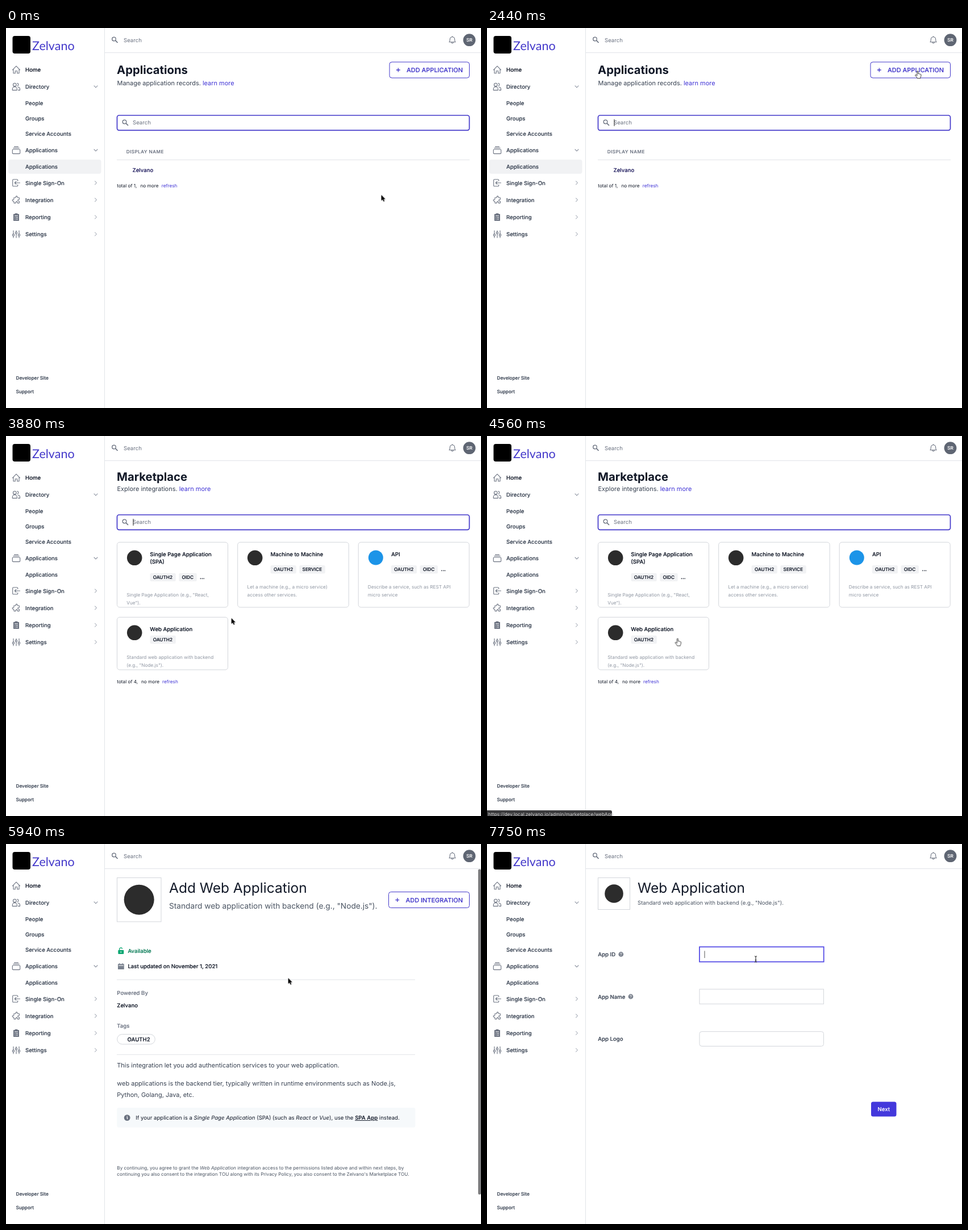
These frames come from a looping animation (836x670 px, 8000 ms). An HTML page:

```html
<!DOCTYPE html>
<html lang="en">
<head>
<meta charset="utf-8">
<title>Admin console</title>
<style>
html, body { margin: 0; width: 100%; height: 100%; overflow: hidden; background: #fff; }
svg { display: block; width: 836px; height: 670px; }
text { font: 400 9.6px Inter, "Liberation Sans", sans-serif; color: #111827; white-space: pre; text-rendering: geometricPrecision; }
text, tspan { fill: currentColor; }
.xs { font-size: 8.23px; }
.md { font-size: 10.96px; }
.lg { font-size: 13.7px; }
.h1 { font-size: 20.3px; font-weight: 700; }
.h2 { font-size: 24.5px; }
/* the hairline stroke thickens medium text a little */
.m { font-weight: 500; stroke: currentColor; stroke-width: .18px; }
.g4 { color: #9097a3; }
.g5 { color: #6b7280; }
.g6 { color: #4b5563; }
.g7 { color: #374151; }
.white { color: #fff; }
.green { color: #067a55; }
.navy { color: #221f60; }
.link { color: #4034d6; }
.brand { font: 400 21.5px Lato, "Open Sans", sans-serif; color: #4338ca; }
.btn { color: #4338ca; font-weight: 500; text-anchor: end; }
.th { letter-spacing: .05em; }
.mid { text-anchor: middle; }
.it { font-style: italic; }
.strong { color: #111827; font-weight: 600; text-decoration: underline; }
.url { font-size: 8.4px; color: #d6d6d6; }
.icon { fill: none; stroke: #6b7280; stroke-width: 1.1; stroke-linecap: round; stroke-linejoin: round; }
.chev { fill: none; stroke: #8f96a3; stroke-width: 1.1; stroke-linecap: round; stroke-linejoin: round; }
.pale { stroke: #b4b9c2; }
.line { stroke: #e1e4e8; }
.card { fill: #fff; stroke: #d3d6db; }
.focus { fill: #fff; stroke: #4338ca; stroke-width: 1.7; }
.outline { fill: #fff; stroke: #4338ca; }
.halo { fill: #fff; stroke: #4f46e5; stroke-width: 1.9; }
.pressed { fill: #f7f7ff; stroke: #c3c5f5; }
.chip { fill: #f1f2f4; }
.seal { fill: #2c2c2c; }
.bar { fill: #3b3b3d; }

/* 1% of the loop is 80 ms */
.t { opacity: 0; animation: 8s step-end infinite; }
.apps { animation-name: apps; }
.market { animation-name: market; }
.detail { animation-name: detail; }
.form { animation-name: form; }
.ring1 { animation-name: ring1; }
.ring2 { animation-name: ring2; }
.url1 { animation-name: url1; }
.url2 { animation-name: url2; }
.url3 { animation-name: url3; }
.caret1 { animation-name: caret1; }
.caret2 { animation-name: caret2; }
.caret3 { animation-name: caret3; }
.field { animation-name: field; }
.arrow { animation-name: arrow; }
.hand { animation-name: hand; }
.ibeam { animation-name: ibeam; }
@keyframes apps { 0% { opacity: 1 } 35.1% { opacity: 0 } }
@keyframes market { 35.1% { opacity: 1 } 62.5% { opacity: 0 } }
@keyframes detail { 62.5% { opacity: 1 } 87.5% { opacity: 0 } }
@keyframes form { 87.5%, 100% { opacity: 1 } }
@keyframes ring1 { 31.25% { opacity: 1 } 35.1% { opacity: 0 } }
@keyframes ring2 { 85% { opacity: 1 } 87.5% { opacity: 0 } }
@keyframes url1 { 31.25% { opacity: 1 } 38.5% { opacity: 0 } }
@keyframes url2 { 53% { opacity: 1 } 67% { opacity: 0 } }
@keyframes url3 { 83.75% { opacity: 1 } 89% { opacity: 0 } }
@keyframes caret1 { 4.75%, 17.25%, 29.75% { opacity: 1 } 11%, 23.5% { opacity: 0 } }
@keyframes caret2 { 35.1%, 47.6%, 60.1% { opacity: 1 } 41.35%, 53.85% { opacity: 0 } }
@keyframes caret3 { 96.85%, 100% { opacity: 1 } }
@keyframes field { 95.35%, 100% { opacity: 1 } }
@keyframes arrow {
  0%, 35.1%, 62.5%, 87.5% { opacity: 1 }
  20.1%, 49.2%, 81%, 91.5% { opacity: 0 }
}
@keyframes hand {
  20.1%, 49.2%, 81% { opacity: 1 }
  35.1%, 62.5%, 87.5% { opacity: 0 }
}
@keyframes ibeam { 91.5%, 100% { opacity: 1 } }

.cursor { animation: path 8s linear infinite; }
@keyframes path {
  0%, 10.1% { transform: translate(660.5px, 294.3px) }
  12.5% { transform: translate(668px, 262px) }
  16.4% { transform: translate(701.5px, 158.3px) }
  19.4% { transform: translate(740px, 90px) }
  21%, 40.6% { transform: translate(758px, 76px) }
  42.5% { transform: translate(700px, 105px) }
  48.5% { transform: translate(397px, 320.8px) }
  50% { transform: translate(353px, 350px) }
  51.3%, 69.5% { transform: translate(335.5px, 357.2px) }
  72% { transform: translate(375px, 303px) }
  76% { transform: translate(590px, 185px) }
  80% { transform: translate(750px, 106px) }
  81.5%, 88.2% { transform: translate(769px, 98px) }
  92.2%, 100% { transform: translate(473px, 203px) }
}
</style>
</head>
<body>
<svg viewBox="0 0 836 670">
  <defs>
    <path id="down" class="chev" d="M-3-1.5 0 1.5 3-1.5"/>
    <path id="right" class="chev pale" d="M-1.5-3 1.5 0-1.5 3"/>
    <g id="lens" fill="none" stroke="#6b7280">
      <circle cx="-1.5" cy="-1.5" r="3.3" stroke-width="1.3"/>
      <path d="M1.2 1.2 5 5" stroke-width="1.7"/>
    </g>
    <g id="help">
      <circle r="4.4" fill="#7b828e"/>
      <path d="M-1.4-.9C-1.4-3 1.5-2.8 1.4-1 1.3 0 0-.1 0 1M0 2v.9" fill="none" stroke="#fff" stroke-width=".9"/>
    </g>
    <path id="plus" d="M-3.4 0H3.4M0-3.4V3.4" stroke="#4338ca" stroke-width="1.3"/>
  </defs>

  <!-- sidebar -->
  <rect width="836" height="670" fill="#fff"/>
  <rect class="t apps" x="4" y="232" width="163.5" height="25" rx="4" fill="#f1f2f4"/>
  <rect x="11.5" y="14" width="31.5" height="31" rx="4"/>
  <text class="brand" x="46" y="38.5">Zelvano</text>

  <g class="icon">
    <path d="M11.5 73.8 18 67.2l6.5 6.6M13 72.5V79.7h3.3v-4h3.4v4H23V72.5"/>
    <circle cx="15.3" cy="100" r="2.8"/>
    <path d="M11.3 109.6v-2a4 4 0 0 1 8 0v2ZM20 97.4a2.5 2.5 0 0 1 0 4.8M21 104.2a3.6 3.6 0 0 1 3.5 3.6v1.8h-3"/>
    <rect x="11.3" y="214" width="13.4" height="7.6" rx="1.3"/>
    <path d="M12.8 211.8h10.4M14.5 209.4h7"/>
    <path d="M20.7 269.8v-1.5q0-1.3-1.3-1.3H13q-1.3 0-1.3 1.3v9.4q0 1.3 1.3 1.3h6.4q1.3 0 1.3-1.3v-1.5M24.5 273H15.3M18 270.3 15.3 273l2.7 2.7"/>
    <path transform="translate(9.8 295) scale(.68)" stroke-width="1.6" d="M11 4a2 2 0 1 1 4 0v1a1 1 0 0 0 1 1h3a1 1 0 0 1 1 1v3a1 1 0 0 1-1 1h-1a2 2 0 1 0 0 4h1a1 1 0 0 1 1 1v3a1 1 0 0 1-1 1h-3a1 1 0 0 1-1-1v-1a2 2 0 1 0-4 0v1a1 1 0 0 1-1 1H7a1 1 0 0 1-1-1v-3a1 1 0 0 0-1-1H4a2 2 0 1 1 0-4h1a1 1 0 0 0 1-1V7a1 1 0 0 1 1-1h3a1 1 0 0 0 1-1z"/>
    <path d="M13 357.2v6M13 367v2.7M18 357.2v2.2M18 363.3v6.4M23 357.2v6M23 367v2.7"/>
    <circle cx="13" cy="365.1" r="1.7"/><circle cx="18" cy="361.3" r="1.7"/><circle cx="23" cy="365.1" r="1.7"/>
  </g>
  <path d="M13 328h2.6v-1.2h4.8V328H23v12H13Z" fill="#6b7280"/>
  <path d="M15 331h6M15 334h1.2M17.5 334H21M15 337h1.2M17.5 337H21" stroke="#fff"/>

  <text class="m" x="34" y="76.5">Home</text>
  <text class="m g7" x="34" y="107">Directory</text>
  <text class="m g7" x="34" y="135.5">People</text>
  <text class="m g7" x="34" y="163">Groups</text>
  <text class="m g7" x="34" y="190.4">Service Accounts</text>
  <text class="m g7" x="34" y="219">Applications</text>
  <text class="m g7" x="34" y="247.8">Applications</text>
  <text class="m g7" x="34" y="276.5">Single Sign-On</text>
  <text class="m g7" x="34" y="306.5">Integration</text>
  <text class="m g7" x="34" y="336.8">Reporting</text>
  <text class="m g7" x="34" y="366.8">Settings</text>
  <text class="m xs g7" x="17.5" y="619.5">Developer Site</text>
  <text class="m xs g7" x="17.5" y="644">Support</text>
  <use href="#down" x="158" y="103.3"/><use href="#down" x="158" y="215.5"/>
  <use href="#right" x="158" y="273"/><use href="#right" x="158" y="303"/>
  <use href="#right" x="158" y="333.3"/><use href="#right" x="158" y="363.3"/>

  <!-- top bar -->
  <path class="line" d="M173.5 0V670M173 43.5H836"/>
  <use href="#lens" x="191.5" y="21"/>
  <text class="g5" x="207" y="25.3">Search</text>
  <path class="icon" d="M780 24.8c1.4-1.4 1.4-2.4 1.4-5a4.1 4.1 0 0 1 8.2 0c0 2.6 0 3.6 1.4 5ZM783.7 25a1.8 1.8 0 0 0 3.6 0M785.5 15.4v-.9"/>
  <circle cx="815.5" cy="21.2" r="10.9" fill="#5f6673"/>
  <text class="m xs mid white" x="815.5" y="24.2">SR</text>

  <!-- applications list -->
  <g class="t apps">
    <text class="h1" x="195" y="81.3">Applications</text>
    <text class="md g7" x="195.5" y="100.6">Manage application records. <tspan class="link">learn more</tspan></text>
    <rect class="outline" x="675" y="60" width="140.5" height="28" rx="4"/>
    <g class="t ring1">
      <rect class="halo" x="673" y="58" width="144.3" height="32" rx="5.5"/>
      <rect class="pressed" x="675" y="60" width="140.5" height="28" rx="4"/>
    </g>
    <use href="#plus" x="690.3" y="74"/>
    <text class="m md btn" x="804" y="78">ADD APPLICATION</text>
    <rect class="focus" x="195.5" y="154" width="620" height="26.3" rx="3.5"/>
    <use href="#lens" x="210" y="167"/>
    <text class="g5" x="223" y="170.4">Search</text>
    <path class="t caret1" d="M224 161V173" stroke="#222"/>
    <text class="m xs th g5" x="211.8" y="221">DISPLAY NAME</text>
    <path class="line" d="M195 232.5H816"/>
    <text class="m navy" x="222.5" y="254">Zelvano</text>
    <text class="xs" x="195.3" y="280.6">total of 1,</text>
    <text class="xs" x="236.5" y="280.6">no more</text>
    <text class="xs link" x="273.7" y="280.6">refresh</text>
  </g>

  <!-- marketplace -->
  <g class="t market">
    <text class="h1" x="195" y="79.2">Marketplace</text>
    <text class="md g7" x="195.5" y="96.5">Explore integrations. <tspan class="link">learn more</tspan></text>
    <rect class="focus" x="195.5" y="139" width="620" height="26.3" rx="3.5"/>
    <use href="#lens" x="210" y="152"/>
    <text class="g5" x="223" y="155.4">Search</text>
    <path class="t caret2" d="M224 146V158" stroke="#222"/>

    <rect class="card" x="195.5" y="187.3" width="195" height="114.7" rx="4.5"/>
    <rect class="card" x="407.7" y="187.3" width="195.5" height="114.7" rx="4.5"/>
    <rect class="card" x="620.2" y="187.3" width="195" height="114.7" rx="4.5"/>
    <rect class="card" x="195.5" y="319.5" width="195" height="92.7" rx="4.5"/>
    <circle class="seal" cx="226.2" cy="214.8" r="13.3"/>
    <circle class="seal" cx="438.2" cy="214.8" r="13.3"/>
    <circle class="seal" cx="226.2" cy="346.8" r="13.3"/>
    <circle cx="650.8" cy="214.5" r="13" fill="#1c94e8"/>

    <text class="m" x="253.3" y="211.6">Single Page Application</text>
    <text class="m" x="253.3" y="225.2">(SPA)</text>
    <text class="m" x="465.5" y="211.6">Machine to Machine</text>
    <text class="m" x="678" y="211.6">API</text>
    <text class="m" x="253.3" y="343.6">Web Application</text>

    <g class="chip">
      <rect x="253.5" y="241.8" width="45.3" height="14.5" rx="2.5"/>
      <rect x="304.3" y="241.8" width="31.5" height="14.5" rx="2.5"/>
      <rect x="465.5" y="228" width="45.3" height="14.5" rx="2.5"/>
      <rect x="516.3" y="228" width="45.5" height="14.5" rx="2.5"/>
      <rect x="677.7" y="228" width="45.3" height="14.5" rx="2.5"/>
      <rect x="728.5" y="228" width="31.5" height="14.5" rx="2.5"/>
      <rect x="253.5" y="351.8" width="45.3" height="14.5" rx="2.5"/>
    </g>
    <text class="m xs" x="258.7" y="252">OAUTH2</text>
    <text class="m xs" x="309.5" y="252">OIDC</text>
    <text class="m" x="341" y="252">...</text>
    <text class="m xs" x="470.9" y="238.2">OAUTH2</text>
    <text class="m xs" x="521.6" y="238.2">SERVICE</text>
    <text class="m xs" x="683" y="238.2">OAUTH2</text>
    <text class="m xs" x="733.8" y="238.2">OIDC</text>
    <text class="m" x="765.3" y="238.2">...</text>
    <text class="m xs" x="258.7" y="362">OAUTH2</text>

    <text class="xs g4" x="212.3" y="282.8">Single Page Application (e.g., "React,</text>
    <text class="xs g4" x="212.3" y="296.8">Vue").</text>
    <text class="xs g4" x="424.6" y="268.8">Let a machine (e.g., a micro service)</text>
    <text class="xs g4" x="424.6" y="283">access other services.</text>
    <text class="xs g4" x="636.8" y="268.8">Describe a service, such as REST API</text>
    <text class="xs g4" x="636.8" y="283">micro service</text>
    <text class="xs g4" x="212.3" y="392.8">Standard web application with backend</text>
    <text class="xs g4" x="212.3" y="407">(e.g., "Node.js").</text>

    <text class="xs" x="195.3" y="435.8">total of 4,</text>
    <text class="xs" x="238" y="435.8">no more</text>
    <text class="xs link" x="275" y="435.8">refresh</text>
  </g>

  <!-- integration details -->
  <g class="t detail">
    <rect x="195.5" y="59.5" width="77.5" height="77.5" fill="#fff" stroke="#d3d6db"/>
    <circle class="seal" cx="234.2" cy="98.2" r="26.5"/>
    <text class="h2" x="287" y="86.2">Add Web Application</text>
    <text class="lg g6" x="287" y="113.6">Standard web application with backend (e.g., "Node.js").</text>
    <rect class="outline" x="673.5" y="84.5" width="142" height="28" rx="4"/>
    <g class="t ring2">
      <rect class="halo" x="671.5" y="82.5" width="145.8" height="32" rx="5.5"/>
      <rect class="pressed" x="673.5" y="84.5" width="142" height="28" rx="4"/>
    </g>
    <use href="#plus" x="688.7" y="98.7"/>
    <text class="m md btn" x="804" y="102.6">ADD INTEGRATION</text>

    <rect x="197.3" y="187" width="10" height="7" rx="1.2" fill="#0fa874"/>
    <path d="M199.6 187v-1.4a2.6 2.6 0 0 1 5.1-.7" fill="none" stroke="#0fa874" stroke-width="1.3"/>
    <circle cx="202.3" cy="190.5" r=".9" fill="#fff"/>
    <text class="m green" x="214.4" y="191.6">Available</text>
    <path d="M197 211.5h2v-1.3h1.4v1.3h4v-1.3h1.4v1.3h2v9.5H197Z" fill="#7a828f"/>
    <path d="M198.2 214.3h8.4" stroke="#fff"/>
    <text class="m" x="214.4" y="219.1">Last updated on November 1, 2021</text>
    <path class="line" d="M195 239.3H720M195 371.3H720"/>
    <text class="m g5" x="195.3" y="266.4">Powered By</text>
    <text class="m" x="195.3" y="288.2">Zelvano</text>
    <text class="m g5" x="195.3" y="324">Tags</text>
    <rect x="195.7" y="335.5" width="66.6" height="17.5" rx="8.7" fill="#fff" stroke="#d3d6db"/>
    <text class="m" x="213.6" y="347.7">OAUTH2</text>
    <text class="md g7" x="195.3" y="393.7">This integration let you add authentication services to your web application.</text>
    <text class="md g7" x="195.3" y="426.4">web applications is the backend tier, typically written in runtime environments such as Node.js,</text>
    <text class="md g7" x="195.3" y="445.6">Python, Golang, Java, etc.</text>
    <rect x="195.3" y="465" width="525" height="34.7" rx="3" fill="#f6f9fb"/>
    <circle cx="213.2" cy="482.6" r="5.4" fill="#6b7280"/>
    <path d="M212.3 482h1.2v3.2M213.2 479.4v1.3" fill="none" stroke="#fff" stroke-width="1.2"/>
    <text x="228.3" y="486">If your application is a <tspan class="it">Single Page Application</tspan> (SPA) (such as <tspan class="it">React</tspan> or <tspan class="it">Vue</tspan>), use the <tspan class="strong">SPA App</tspan> instead.</text>
    <text class="xs g6" x="195.3" y="574.2">By continuing, you agree to grant the <tspan class="it">Web Application</tspan> integration access to the permissions listed above and within next steps, by</text>
    <text class="xs g6" x="195.3" y="585.2">continuing you also consent to the integration TOU along with its Privacy Policy, you also consent to the Zelvano's Marketplace TOU.</text>
    <rect x="831" y="44.5" width="5" height="573.5" rx="2" fill="#7c7c7e"/>
  </g>

  <!-- new application form -->
  <g class="t form">
    <rect x="195.5" y="59.5" width="56" height="56" fill="#fff" stroke="#d3d6db"/>
    <circle class="seal" cx="223.5" cy="87.5" r="16.3"/>
    <text class="h2" x="265" y="86.2">Web Application</text>
    <text class="g6" x="265" y="107">Standard web application with backend (e.g., "Node.js").</text>
    <text class="m g7" x="195.3" y="198">App ID</text>
    <text class="m g7" x="195.3" y="272.5">App Name</text>
    <text class="m g7" x="195.3" y="347">App Logo</text>
    <use href="#help" x="235.8" y="194.5"/>
    <use href="#help" x="253" y="269"/>
    <rect class="card" x="374" y="181.5" width="218.5" height="26"/>
    <rect class="card" x="374" y="256" width="218.5" height="26"/>
    <rect class="card" x="374" y="330.7" width="218.5" height="25.8" rx="4"/>
    <rect class="focus t field" x="374" y="181.4" width="218.7" height="26.3" style="stroke:#4f46e5"/>
    <path class="t caret3" d="M383 188.5V201" stroke="#555"/>
    <rect x="676" y="454.5" width="44.5" height="26" rx="3.5" fill="#4338dc"/>
    <text class="m mid white" x="698.2" y="471">Next</text>
  </g>

  <!-- link previews -->
  <g class="t url1">
    <path class="bar" d="M0 660H274q3 0 3 3v7H0Z"/>
    <text class="url" x="2" y="670">https://dev.local.zelvano.io/admin/marketplace?facet=oauth2;keywo...</text>
  </g>
  <g class="t url2">
    <path class="bar" d="M0 660H217q3 0 3 3v7H0Z"/>
    <text class="url" x="2" y="670">https://dev.local.zelvano.io/admin/marketplace/webApp</text>
  </g>
  <g class="t url3">
    <path class="bar" d="M0 660H235q3 0 3 3v7H0Z"/>
    <text class="url" x="2" y="670">https://dev.local.zelvano.io/admin/marketplace/webApp/add</text>
  </g>

  <!-- pointer -->
  <g class="cursor">
    <path class="t arrow" d="M0 0V10.2L2.3 8 4 11.8 5.8 11 4.1 7.4H7.3Z" stroke="#fff" stroke-width=".8" paint-order="stroke"/>
    <path class="t hand" d="M-1.1 8.2V1q0-1.2 1-1.2t1 1.2V4.6q1.6-.6 2 .4 1.4-.4 1.8.5 1.3-.2 1.3 1.2 0 3.2-1.3 5V12.8H-.6q-.6-1.9-3.4-4.8-.8-1 .2-1.6 1-.4 2.7 1.8Z" fill="#fff" stroke="#222" stroke-width=".9"/>
    <path class="t ibeam" d="M-2-5.2Q0-5.2 0-4V4Q0 5.2-2 5.2M2-5.2Q0-5.2 0-4M0 4Q0 5.2 2 5.2M-1.3 1.8H1.3" fill="none" stroke="#111"/>
  </g>
</svg>
</body>
</html>
```
